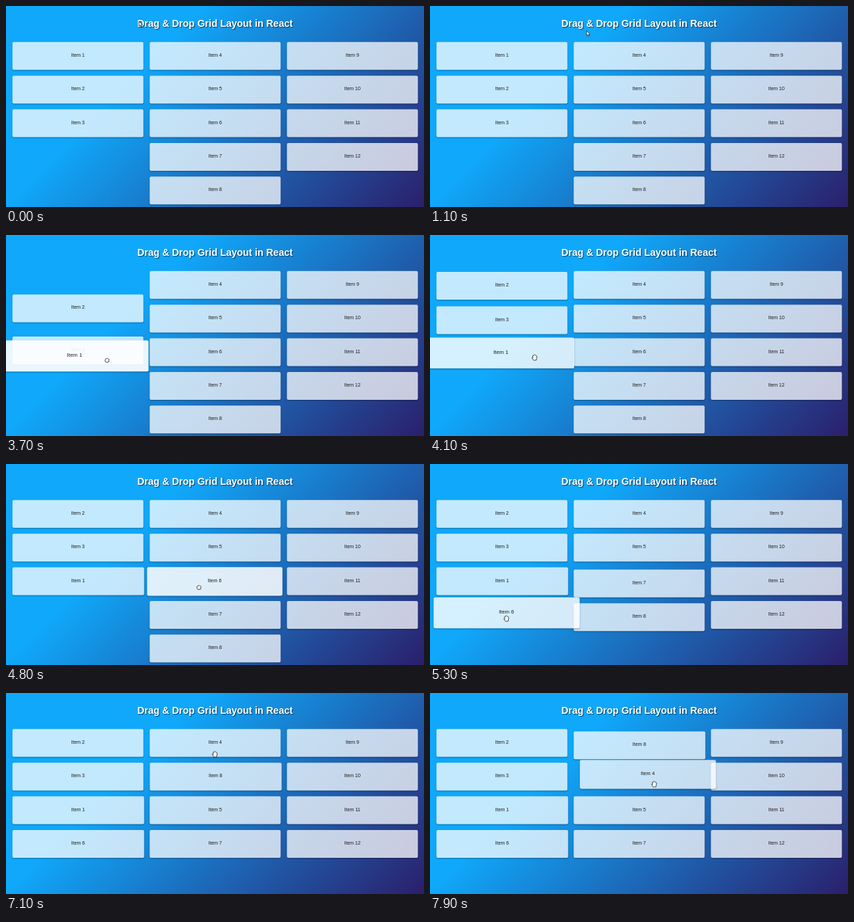
An HTML page that plays this animation: 600 by 289 pixels, repeating every 8 s.

```html
<!DOCTYPE html>
<html lang="en">
<head>
<meta charset="utf-8">
<title>Drag &amp; Drop Grid</title>
<style>
  html, body { margin: 0; width: 100%; height: 100%; overflow: hidden; }
  body {
    position: relative;
    background: linear-gradient(135deg, #10a8fa 32%, #2b1f6b);
    font-family: "Liberation Sans", Arial, sans-serif;
  }
  h1 {
    position: absolute; left: 0; top: 0; width: 600px; margin: 0;
    font-size: 14px; line-height: 50px; text-align: center; color: #fff;
    text-shadow: 1px 1px 1px rgba(0, 0, 0, .6);
  }
  .card {
    position: absolute; left: -94.25px; top: -19.75px; width: 188.5px; height: 39.5px;
    border-radius: 2px; box-shadow: 0 1px 2px rgba(0, 0, 0, .35);
    font-size: 7px; line-height: 37.5px; text-align: center; color: #1c1c1c;
  }
  #cursor { position: absolute; left: -8px; top: -8px; z-index: 5; }
  #cursor path { fill: #fff; stroke: #222; stroke-width: .8; stroke-linejoin: round; }
</style>
</head>
<body>
<h1>Drag &amp; Drop Grid Layout in React</h1>
<svg id="cursor" width="16" height="16" viewBox="-8 -8 16 16"><path/></svg>
<script>
const LOOP = 8000;
const SHAPES = {
  arrow: 'M-2-4V3L-.4 1.6.7 4 1.8 3.5.8 1.2H3Z',
  open: 'M-1.6 4-4 .5Q-3.8-.6-2.4.6L-3-2.4Q-2.4-3.4-1.6-2.4L-1.2-3.6Q-.5-4.4.2-3.5L.6-3.3Q1.4-3.9 1.8-2.8L2-2.1Q3.2-2.4 3.2-1.2L2.3 4Z',
  closed: 'M-1.6 3-3 .8Q-3.2-.4-2.2-.4V-1.8Q-1.4-3-.6-2.2 .2-3 .9-2.2 1.7-2.6 2.1-1.7 3.1-1.6 3-.4L2.1 3Z'
};

// Pointer path: time, x, y
const PATH = [
  [0, 193, 26], [800, 230, 38], [1500, 222, 42], [2400, 144.5, 50.5], [3250, 150, 78],
  [3700, 145, 180], [4050, 148, 176], [4700, 278, 177], [4780, 278, 177], [5250, 88, 222],
  [5480, 262, 223], [6000, 267, 138], [6250, 292, 124], [6500, 290, 128], [7050, 300, 88],
  [7200, 300, 88], [7670, 343, 125], [7900, 322, 131], [8000, 321, 131]
];

// Moves per item: [start, column, row], or [release, column, row, press] when dragged
const MOVES = {
  1: [[4050, 0, 2, 3250]],
  2: [[3600, 0, 0]],
  3: [[3667, 0, 1]],
  4: [[7670, 1, 1, 7200]],
  5: [[5960, 1, 2]],
  6: [[5250, 0, 3, 4720]],
  7: [[4900, 1, 2], [5815, 1, 3]],
  8: [[4900, 1, 3], [6500, 1, 1, 5480], [7510, 1, 0]]
};

const mix = (a, b, k) => a + (b - a) * k;
const mixPoint = (p, q, k) => [mix(p[0], q[0], k), mix(p[1], q[1], k)];
const slot = (col, row) => [103.25 + 197 * col, 71.75 + 48.4 * row];

// Critically damped spring and a quicker fade, both from 0 to 1
const spring = ms => ms <= 0 ? 0 : 1 - (1 + .011 * ms) * Math.exp(-.011 * ms);
const fade = ms => ms <= 0 ? 0 : 1 - Math.exp(-.015 * ms);

function pointer(t) {
  const i = Math.max(1, PATH.findIndex(p => p[0] > t));
  const [t0, ...from] = PATH[i - 1], [t1, ...to] = PATH[i];
  const k = (t - t0) / (t1 - t0);
  return mixPoint(from, to, k * k * (3 - 2 * k));
}

function pose(item, t) {
  let at = item.home, lift = 0, glow = 0, held = false;
  for (const [time, col, row, press] of item.moves) {
    if (t < (press ?? time)) break;
    if (press) {
      const end = Math.min(t, time), a = pointer(press), b = pointer(end);
      at = [at[0] + b[0] - a[0], at[1] + b[1] - a[1]];
      held = t < time;
      lift = spring(end - press) * (1 - spring(t - time));
      glow = fade(end - press) * (1 - fade(t - time));
    }
    at = mixPoint(at, slot(col, row), spring(t - time));
  }
  return { at, lift, glow, held };
}

const cursor = document.getElementById('cursor');
const items = [3, 5, 4].flatMap((count, col) =>
  Array.from({ length: count }, (_, row) => ({ home: slot(col, row) })));
items.forEach((item, i) => {
  item.moves = MOVES[i + 1] || [];
  item.el = document.createElement('div');
  item.el.className = 'card';
  item.el.textContent = `Item ${i + 1}`;
  document.body.append(item.el);
});

function draw(now) {
  const t = now % LOOP;
  const [x, y] = pointer(t);
  let shape = 'arrow';
  for (const item of items) {
    const { at, lift, glow, held } = pose(item, t);
    const style = item.el.style;
    style.transform = `translate(${at[0]}px, ${at[1]}px) scale(${1 + .125 * lift})`;
    style.background = `rgba(255, 255, 255, ${.75 + .16 * glow})`;
    style.zIndex = lift > .01 || held ? 2 : 1;
    const over = Math.abs(x - at[0]) < 94.25 && Math.abs(y - at[1]) < 19.75;
    if (held) shape = 'closed';
    else if (over && shape === 'arrow') shape = 'open';
  }
  cursor.style.transform = `translate(${x}px, ${y}px)`;
  cursor.firstChild.setAttribute('d', SHAPES[shape]);
  requestAnimationFrame(draw);
}
draw(performance.now());
</script>
</body>
</html>
```
